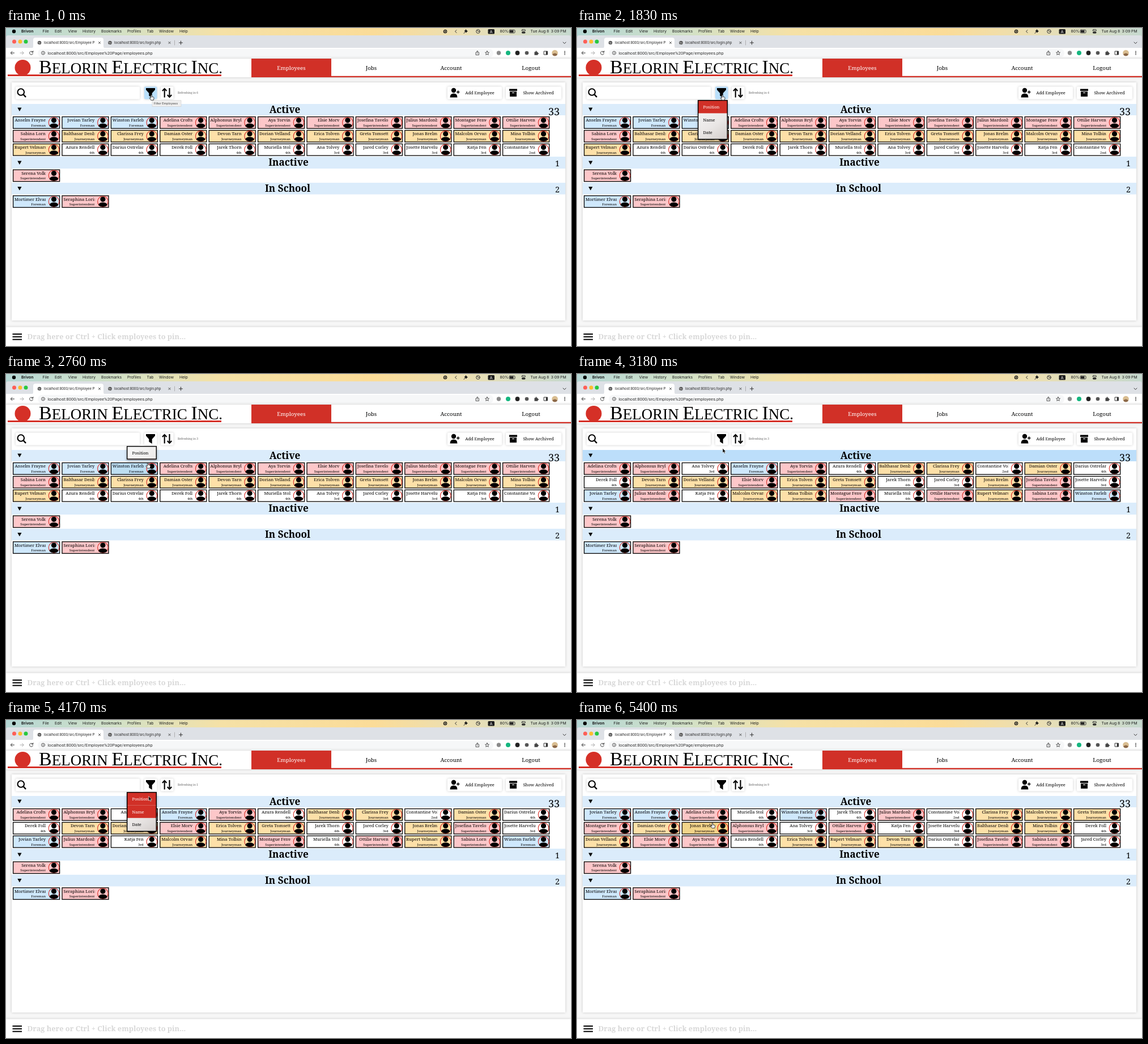
Recreate the animation shown at these times as an HTML page. Size 997 by 561 pixels, loop 5430 ms.

```html
<!DOCTYPE html>
<html lang="en">
<head>
<meta charset="utf-8">
<title>Employees</title>
<style>
  html, body { margin: 0; width: 100%; height: 100%; overflow: hidden; background: #fff; }
  svg { display: block; }
  #stage { width: 997px; height: 561px; font-family: "Noto Serif", Georgia, serif; }
  .ui { font-family: Inter, "Open Sans", sans-serif; }
  .web { font-family: Roboto, Arial, sans-serif; }
  .mid { text-anchor: middle; }
  .title { font-size: 17.1px; font-weight: 700; text-anchor: middle; }
  .nav { font-size: 9.8px; text-anchor: middle; }
  .line { fill: none; stroke: #333; stroke-width: 1; stroke-linecap: round; stroke-linejoin: round; }
  .lift { filter: drop-shadow(0 0 2px rgba(0, 0, 0, .2)); }
</style>
</head>
<body>
<svg id="stage" viewBox="0 0 997 561" xmlns="http://www.w3.org/2000/svg">
  <defs>
    <linearGradient id="sky">
      <stop offset="0" stop-color="#b4d6d4"/><stop offset=".2" stop-color="#d3e1c6"/><stop offset=".38" stop-color="#f5e1a6"/>
      <stop offset=".65" stop-color="#fbdc98"/><stop offset=".82" stop-color="#eadfb4"/><stop offset="1" stop-color="#c6d9cf"/>
    </linearGradient>
    <linearGradient id="sheet" x1=".3" y1="0" x2=".8" y2="1">
      <stop offset="0" stop-color="#f7f7f7"/><stop offset=".6" stop-color="#eae7e6"/><stop offset="1" stop-color="#d6d1cf"/>
    </linearGradient>
    <clipPath id="menuClip"><rect id="menuClipBox" x="213" y="127" width="53"/></clipPath>
    <g id="globe"><circle r="3.3" fill="#555"/><path d="M-2.5-1C-1 0 1-1 2 1M-1 2.5 0 .8" stroke="#eee" fill="none" stroke-width=".7"/></g>
    <path id="cross" class="line" d="M-1.7-1.7 1.7 1.7M1.7-1.7-1.7 1.7" style="stroke-width:.8"/>
    <path id="fold" d="M20.3-3H27.5L23.9 3.5Z"/>
    <g id="face">
      <circle cx="72.5" cy="10.8" r="9.3" fill="none" stroke="#d8322b" stroke-width="1.1"/>
      <circle cx="72.5" cy="6.8" r="4.6"/>
      <path d="M64.8 17.4C64.8 14 68 12.4 72.5 12.4S80.2 14 80.2 17.4Q77 20.3 72.5 20.3T64.8 17.4Z"/>
    </g>
  </defs>

  <rect width="997" height="561" fill="#f7f7f7"/>

  <rect width="997" height="20" fill="url(#sky)"/>
  <circle cx="14" cy="6" r="3.2"/>
  <g class="ui" id="menubar" font-size="6.8" fill="#1c1c1c">
    <circle cx="775" cy="6" r="2.7" fill="none" stroke="#111" stroke-width="1.2"/><circle cx="775" cy="6" r="1.2"/>
    <path class="line" d="M795 3.5 792.5 6 795 8.5"/>
    <path d="M811 2 815 6 813.5 6.5 812 8.5 808.5 5 810.5 4Z"/><path class="line" d="M810 7 808 9.5"/>
    <circle cx="833" cy="6" r="3.3" class="line"/><path class="line" d="M831.5 4 833 6H835"/>
    <rect x="850.5" y="2" width="11.5" height="8.5" rx="1.5"/><text x="856.2" y="8.6" class="mid" fill="#fff">A</text>
    <rect x="888" y="3.3" width="10" height="5.5" rx="1.4" class="line"/><rect x="889" y="4.3" width="6.5" height="3.5"/>
    <rect x="910" y="2.8" width="6.5" height="2.6" rx="1.3" class="line"/><rect x="910" y="6.8" width="6.5" height="2.6" rx="1.3"/>
  </g>

  <path d="M0 36V17Q0 13 4 13H993Q997 13 997 17V36Z" fill="#dee1e6"/>
  <circle cx="14.5" cy="24" r="3.5" fill="#fe5f57"/><circle cx="25" cy="24" r="3.5" fill="#febc2e"/><circle cx="35" cy="24" r="3.5" fill="#28c840"/>
  <path d="M44 36Q48 36 48 32V21Q48 17 52 17H168Q172 17 172 21V32Q172 36 176 36Z" fill="#fff"/>
  <rect y="35" width="997" height="18.5" fill="#fff"/>
  <use href="#globe" x="59" y="26"/><use href="#globe" x="183.5" y="26"/>
  <use href="#cross" x="165" y="26"/><use href="#cross" x="288.5" y="26"/>
  <path class="line" d="M297.5 22V30" style="stroke:#999;stroke-width:.7"/>
  <path class="line" d="M305.5 26H311.5M308.5 23V29M983 25 985.5 27.5 988 25"/>
  <g class="web" fill="#333">
    <text x="67" y="28.2" font-size="6.4">localhost:8000/src/Employee P</text>
    <text x="191" y="28.2" font-size="6.4">localhost:8000/src/login.php</text>
    <rect x="56" y="37" width="804" height="14.5" rx="7.2" fill="#f6f7f8"/>
    <text x="73.5" y="46.7" font-size="7.6">localhost:8000/src/Employee%20Page/employees.php</text>
  </g>
  <path class="line" d="M14.5 44H8.5M11 41.2 8.3 44 11 46.8"/>
  <path class="line" d="M25 44H31M28.5 41.2 31.2 44 28.5 46.8" style="stroke:#aaa"/>
  <path class="line" d="M47 42.2A3 3 0 1 0 47.5 45M47.8 40.5V42.8H45.5"/>
  <circle cx="65.5" cy="44" r="3" class="line" style="stroke-width:.8"/><path class="line" d="M65.5 43.8V45.4M65.5 42.4V42.5" style="stroke-width:.8"/>
  <path class="line" d="M830 43H829V47.5H834.5V43H833.5M831.8 45V40.5M830.3 42 831.8 40.4 833.3 42" style="stroke-width:.8"/>
  <path class="line" d="M849 40.5 850 43 852.5 43.2 850.6 44.9 851.2 47.4 849 46 846.8 47.4 847.4 44.9 845.5 43.2 848 43Z" style="stroke-width:.8"/>
  <circle cx="869.5" cy="44" r="3.7" fill="#8a8a8a"/><circle cx="886" cy="44" r="4" fill="#15b67f"/>
  <circle cx="902.5" cy="44" r="3.9" fill="#222"/><circle cx="919" cy="44" r="3.3" fill="#555"/>
  <path d="M932.5 42.3H934.5Q934 40.3 935.5 40.3T936.5 42.3H938.5V44Q940 43.6 940 45T938.5 46V47.7H932.5Z" fill="#444"/>
  <rect x="949.5" y="41" width="6" height="6" class="line"/><path d="M952.7 41H955.5V47H952.7Z" fill="#333"/>
  <circle cx="968.5" cy="44" r="5.3" fill="#d9bd91"/><path d="M964 46.8A5.3 5.3 0 0 0 973 46.8Q968.5 42 964 46.8Z" fill="#8c6848"/>
  <g fill="#333"><circle cx="986" cy="41.4" r=".9"/><circle cx="986" cy="44" r=".9"/><circle cx="986" cy="46.6" r=".9"/></g>

  <rect y="53.5" width="997" height="33.5" fill="#fff" class="lift"/>
  <path d="M0 53.5H997" stroke="#ddd" stroke-width=".7"/>
  <circle cx="29.5" cy="70" r="14" fill="#d53027"/>
  <rect x="3" y="82" width="377" height="3" fill="#d53027"/>
  <text x="58" y="80" font-family="Liberation Serif, Times New Roman, serif" font-size="27"><tspan font-size="34">B</tspan>ELORIN <tspan font-size="34">E</tspan>LECTRIC <tspan font-size="34">I</tspan>NC.</text>
  <rect x="433" y="54" width="141" height="32" fill="#d13027"/><rect x="433" y="84.7" width="564" height="2.3" fill="#d13027"/>
  <text class="nav" x="503.5" y="73.8" fill="#fff">Employees</text>
  <text class="nav" x="644.5" y="73.8">Jobs</text><text class="nav" x="785.5" y="73.8">Account</text><text class="nav" x="926.5" y="73.8">Logout</text>

  <rect x="10" y="96" width="977" height="420" fill="#fff" class="lift"/>
  <g class="lift" fill="#fff">
    <rect x="17" y="103.5" width="219" height="22" rx="2"/>
    <rect id="filterButton" x="244" y="103.5" width="22.5" height="22" rx="2"/>
    <rect x="273" y="103.5" width="22.5" height="22" rx="2"/>
    <rect x="779" y="103.5" width="96" height="22" rx="2"/>
    <rect x="882" y="103.5" width="98" height="22" rx="2"/>
  </g>
  <circle cx="26.3" cy="113" r="5.8" fill="none" stroke="#000" stroke-width="2.1"/><path d="M30.5 117.2 35 122" stroke="#000" stroke-width="2.5"/>
  <path d="M247 106H263V109L257.7 115V123L252.3 119.5V115L247 109Z"/>
  <path d="M279.7 122.5V107M275.9 111 279.7 107 283.5 111M288.5 106V121.7M284.7 118 288.5 122 292.3 118" fill="none" stroke="#000" stroke-width="2.1"/>
  <text id="refresh" x="303" y="116.2" font-size="5" fill="#666"></text>
  <circle cx="790" cy="110" r="4.2"/><path d="M783.5 122.5Q783.5 115.5 790 115.5T796.5 122.5Z"/><path d="M795 113H800.5M797.7 110.2V115.8" stroke="#000" stroke-width="1.5"/>
  <path d="M888 107.5H902V111H888ZM889 112H901V121H889Z"/><path d="M893 114.3H897" stroke="#fff" stroke-width="1.2"/>
  <text x="836" y="117.2" font-size="7.5" class="mid">Add Employee</text><text x="939.5" y="117.2" font-size="7.5" class="mid">Show Archived</text>

  <g fill="#dbecfb"><rect id="activeBar" x="10" y="134" width="977" height="20"/><rect x="10" y="227" width="977" height="21"/><rect x="10" y="273" width="977" height="20.5"/></g>
  <use href="#fold" y="143.5"/><use href="#fold" y="237.5"/><use href="#fold" y="283"/>
  <text class="title" x="492" y="149.8">Active</text><text class="title" x="498.5" y="243.2">Inactive</text><text class="title" x="497" y="289">In School</text>
  <g text-anchor="end" font-weight="500"><text x="977" y="154" font-size="17.8">33</text><text x="977" y="244" font-size="14.2">1</text><text x="977" y="290" font-size="14.2">2</text></g>

  <g id="cards"></g>

  <g class="lift"><rect y="527.5" width="997" height="34" fill="#fff"/><rect x="9" y="534" width="21" height="21" rx="2" fill="#fff"/></g>
  <path d="M11.5 540H28M11.5 544.8H28M11.5 549.6H28" stroke="#000" stroke-width="2"/>
  <text x="37.5" y="549" font-size="12.75" font-weight="700" fill="#d8d8d8">Drag here or Ctrl + Click employees to pin...</text>

  <g id="tooltip" class="ui"><rect x="258" y="127.8" width="51" height="10.5" fill="#efefef" stroke="#ccc" stroke-width=".6"/><text x="261" y="135" font-size="5.4" fill="#444">Filter Employees</text></g>

  <g id="menu" style="filter:drop-shadow(0 2px 2px rgba(0,0,0,.35))">
    <g clip-path="url(#menuClip)"><rect x="213" y="127" width="53" height="70" fill="url(#sheet)"/><g id="items"></g></g>
    <rect id="menuFrame" x="213.7" y="127.7" width="51.6" fill="none" stroke="#000" stroke-width="1.4"/>
  </g>

  <g id="cursor" stroke-linejoin="round">
    <path id="arrow" d="M0 0V8L1.9 6.4 3.1 9.2 4.5 8.6 3.3 5.9H5.7Z" fill="#000" stroke="#fff" stroke-width=".6"/>
    <path id="hand" d="M-.9.7Q0-.6.9.7V3.3L4 4.1Q4.8 4.4 4.6 5.5L3.9 9.2H-.8L-3.3 5.6Q-3.3 4.3-2 4.9L-.9 6Z" fill="#fff" stroke="#111" stroke-width=".8"/>
  </g>
</svg>

<script>
const LOOP = 5430, STEP = 30;
const $ = id => document.getElementById(id);
const set = (node, attrs) => { for (const k in attrs) node.setAttribute(k, attrs[k]); };
function add(parent, tag, attrs, text) {
  const node = document.createElementNS('http://www.w3.org/2000/svg', tag);
  set(node, attrs);
  if (text) node.textContent = text;
  return parent.appendChild(node);
}

// Rank order doubles as the "Position" sort order.
const RANKS = 'FSJ432';
const ROLES = {
  F: ['Foreman', '#cfe8fc'], S: ['Superintendent', '#fdc7c9'], J: ['Journeyman', '#fde0a8'],
  4: ['4th', '#fff'], 3: ['3rd', '#fff'], 2: ['2nd', '#fff']
};
const STAFF = `S Adelina Crofts,S Alphonsus Brylston,3 Ana Tolvey,F Anselm Frayne,S Aya Torvin,4 Azura Rendell,
J Balthasar Denbury,J Clarissa Frey,2 Constantine Vollard,J Damian Oster,4 Darius Ostrelande,4 Derek Foll,J Devon Tarn,
J Dorian Vellandby,S Elsie Morv,J Erica Tolven,J Greta Tomsett,4 Jarek Thorn,3 Jared Corley,J Jonas Brelm,
S Josefina Tavelord,3 Josette Harvelund,F Jovian Tarley,S Julius Mardonby,3 Katja Fen,J Malcolm Orvandale,J Mina Tolbin,
S Montague Fenwold,4 Muriella Stol,S Ottilie Harven,J Rupert Velmarsen,S Sabina Lorn,F Winston Farlebury`.split(/,\s*/);

const byName = STAFF.map((_, i) => i);
const rank = i => RANKS.indexOf(STAFF[i][0]);
const byPosition = [...byName].sort((a, b) => rank(a) - rank(b) || a - b);
const byDate = [22, 3, 0, 28, 32, 17, 23, 8, 7, 25, 16, 27, 9, 19, 1, 2, 29, 24, 21, 6, 26, 11,
  13, 14, 4, 5, 15, 30, 12, 10, 20, 31, 18];

const slotX = i => 12 + (i % 11) * 86.4;
const slotY = i => 156 + Math.floor(i / 11) * 23.9;

function makeCard(entry) {
  const [role, color] = ROLES[entry[0]];
  const card = add($('cards'), 'g', {});
  add(card, 'rect', { x: .6, y: .6, width: 82, height: 20.6, fill: color, stroke: '#000', 'stroke-width': 1.3 });
  const box = add(card, 'svg', { x: 2, y: 1, width: 56, height: 19 });
  const name = add(box, 'text', { x: 56, y: 8.3, 'font-size': 7.6, 'text-anchor': 'end' }, entry.slice(2));
  if (name.getComputedTextLength() > 56) set(name, { x: 1, 'text-anchor': 'start' });
  add(box, 'text', { x: 56, y: 16.8, 'font-size': 6, 'text-anchor': 'end' }, role);
  add(card, 'use', { href: '#face' });
  return card;
}
const place = (card, x, y) => set(card, { transform: `translate(${x} ${y})` });

const cards = STAFF.map(makeCard);
place(makeCard('S Serena Volk'), 12, 249.5);
place(makeCard('F Mortimer Elvanside'), 12, 295.3);
place(makeCard('S Seraphina Lorimond'), 98.4, 295.3);

const items = ['Position', 'Name', 'Date'].map((label, i) => {
  const y = 128 + i * 22.4;
  return {
    back: add($('items'), 'rect', { x: 214, y, width: 51, height: 22.4, fill: '#d13027' }),
    text: add($('items'), 'text', { x: 222.5, y: y + 14.3, 'font-size': 7.5 }, label)
  };
});

[['Brivon', 27, 700], ['File', 64.5], ['Edit', 86], ['View', 109.5], ['History', 135], ['Bookmarks', 168], ['Profiles', 214],
 ['Tab', 248.5], ['Window', 270], ['Help', 306], ['80%', 871.5], ['Tue Aug 8', 925.5], ['3:09 PM', 961.5]]
  .forEach(([label, x, weight = 400]) => add($('menubar'), 'text', { x, y: 8.4, 'font-weight': weight }, label));

const smooth = (t, from, span) => {
  const u = Math.min(1, Math.max(0, (t - from) / span));
  return u * u * (3 - 2 * u);
};

// time, x, y of the pointer tip
const PATH = [[0, 256.5, 118], [1900, 256.5, 118], [2400, 249, 162], [2650, 249, 162], [3080, 257, 131],
  [3200, 257, 131], [3560, 258, 111], [3900, 258, 111], [4600, 239, 181.5], [LOOP, 239, 181.5]];
function pointerAt(t) {
  const i = PATH.findIndex(p => p[0] > t);
  const [t0, x0, y0] = PATH[i - 1], [t1, x1, y1] = PATH[i];
  const u = smooth(t, t0, t1 - t0);
  return [x0 + (x1 - x0) * u, y0 + (y1 - y0) * u];
}

const OPEN_1 = 1350, CLOSE_1 = 2547, OPEN_2 = 3738, CLOSE_2 = 4772, SLIDE = 350, SORT_DELAY = 273;
function menuHeight(t) {
  return 70 * (smooth(t, OPEN_1, SLIDE) - smooth(t, CLOSE_1, SLIDE) + smooth(t, OPEN_2, SLIDE) - smooth(t, CLOSE_2, SLIDE));
}

const SECOND = 820, RELOAD = 4560;
function countdown(t) {
  return t < RELOAD ? 6 - Math.floor((t + 20) / SECOND) : 10 - Math.floor((t - RELOAD) / SECOND);
}

const show = (node, on) => { node.style.display = on ? '' : 'none'; };

function render(t) {
  const [x, y] = pointerAt(t), hitY = y + 4;
  const inside = (left, top, w, h) => x >= left && x <= left + w && hitY >= top && hitY <= top + h;

  const height = menuHeight(t), menuOpen = height > .2;
  const overMenu = menuOpen && inside(213, 127, 53, height);
  const chosen = t < CLOSE_1 ? 0 : t < CLOSE_2 ? 1 : 2;
  show($('menu'), menuOpen);
  set($('menuClipBox'), { height: Math.max(3, height) });
  set($('menuFrame'), { height: Math.max(2.4, height - 1.4) });
  items.forEach(({ back, text }, i) => {
    const red = i === chosen || overMenu && inside(214, 128 + i * 22.4, 51, 22.3);
    show(back, red);
    set(text, { fill: red ? '#fff' : '#000' });
  });

  const overFilter = inside(244, 103, 23, 23);
  set($('filterButton'), { fill: overFilter ? '#b9dffb' : '#fff' });
  set($('activeBar'), { fill: !overMenu && inside(10, 134, 977, 20) ? '#bcdefa' : '#dbecfb' });
  show($('tooltip'), t < OPEN_1);
  $('refresh').textContent = 'Refreshing in ' + countdown(t);

  const order = t < CLOSE_1 + SORT_DELAY ? byPosition : t < CLOSE_2 + SORT_DELAY ? byName : byDate;
  let overCard = false;
  order.forEach((id, slot) => {
    const hot = !overMenu && inside(slotX(slot), slotY(slot), 83, 21.6);
    overCard = overCard || hot;
    place(cards[id], slotX(slot), slotY(slot));
    cards[id].style.filter = hot ? 'saturate(1.4) brightness(.95)' : '';
  });

  const pointing = overFilter || overCard;
  show($('hand'), pointing);
  show($('arrow'), !pointing);
  place($('cursor'), x, y);
}

const start = performance.now();
function tick() {
  const t = (performance.now() - start) % LOOP;
  render(Math.floor(t / STEP) * STEP);
  requestAnimationFrame(tick);
}
tick();
</script>
</body>
</html>
```
